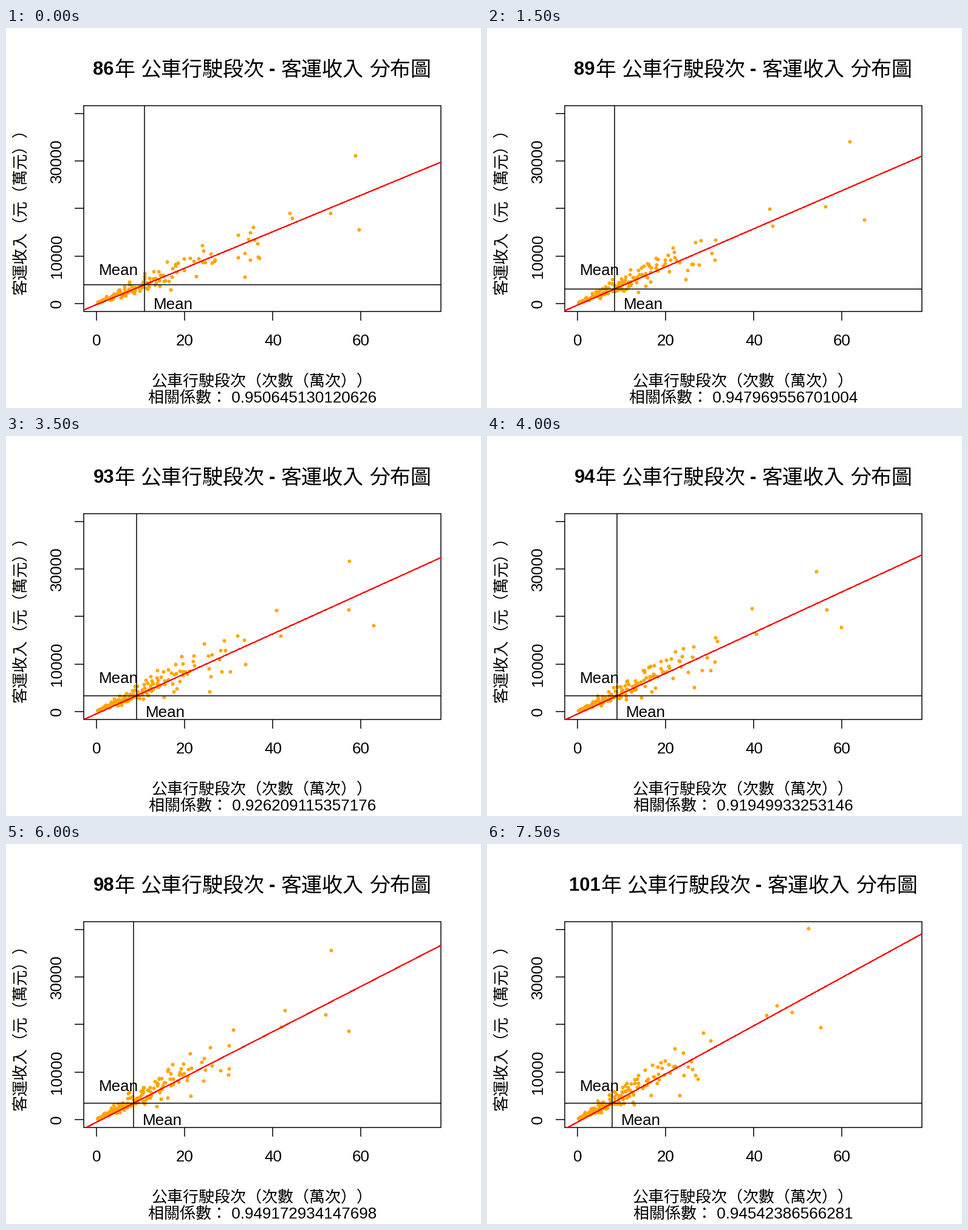
These frames come from a looping animation (782 px wide and 626 px high, 8000 ms). A matplotlib script:

```python
import numpy as np
import matplotlib.pyplot as plt
from matplotlib.animation import FuncAnimation
from matplotlib.patches import Rectangle

W, H, DPI = 782, 626, 64
YEARS = 16
PT = 72 / DPI  # points per pixel
plt.rcParams["font.family"] = ["Liberation Sans", "Noto Sans CJK JP"]

LEFT, RIGHT, TOP, BOTTOM = 128, 716, 128, 467
X0, Y0 = 149.4, 454
X_UNIT, Y_UNIT = 7.25, 78.3 / 10000

# Key years, counted from 86, and their statistics (positions in pixels)
KEYS = [0, 3, 5, 8, 10, 12, 15]
MEAN_X = [228, 210, 217, 214, 214, 210, 206]
MEAN_Y = [423, 430, 427, 428, 427, 427, 427]
FIT_END = [221, 211, 209, 196, 193, 167, 148]
CORR = [0.950645130120626, 0.947969556701004, 0.939628681008609,
        0.91949933253146, 0.948373566108065, 0.949172934147698,
        0.94542386566281]

# Paths of the five busiest routes
PATH_YEARS = [0, 5, 8, 15]
PATHS = [
    [(575, 210), (611, 171), (542, 223), (529, 139)],
    [(581, 332), (648, 305), (583, 315), (549, 302)],
    [(534, 305), (573, 287), (559, 286), (502, 277)],
    [(467, 305), (463, 293), (436, 284), (477, 266)],
    [(471, 313), (469, 334), (443, 326), (460, 282)],
]

# Other routes: dense near zero, with a thin tail of long ones
ROUTES = 200
rng = np.random.default_rng(86)
u = rng.permutation(np.linspace(0, 0.99, ROUTES))
TRIPS = 0.2 + 22 * u ** 1.7 + 13 * u ** 12
RATIO = np.clip(rng.normal(1, 0.22, ROUTES), 0.45, 1.7)


def at(year, values):
    return np.interp(year, KEYS, values)


def stats(year):
    """Mean position and slope of the fit, which runs through the mean."""
    mx, my = at(year, MEAN_X), at(year, MEAN_Y)
    return mx, my, (at(year, FIT_END) - my) / (RIGHT - mx)


def points(year):
    mx, _, slope = stats(year)
    noise = np.random.default_rng(year)
    n = int(np.interp(year, [0, 3], [150, ROUTES]))
    dx = TRIPS[:n] * (mx - X0) / 9.3 * noise.normal(1, 0.05, n)
    dy = dx * slope * RATIO[:n] * noise.normal(0.98, 0.06, n)
    cloud = np.column_stack([X0 + dx, Y0 - 1 + dy])
    busy = [[np.interp(year, PATH_YEARS, c) for c in zip(*p)] for p in PATHS]
    return np.vstack([cloud, busy])


fig = plt.figure(figsize=(W / DPI, H / DPI), dpi=DPI, facecolor="white")
ax = fig.add_axes([0, 0, 1, 1])
ax.set_xlim(0, W)
ax.set_ylim(H, 0)
ax.axis("off")


def label(x, y, s, size=26, ha="center", **kw):
    return ax.text(x, y, s, fontsize=size * PT, ha=ha, va="baseline",
                   rotation_mode="anchor", color="black", zorder=4, **kw)


def line(xs, ys, color="black", width=1.5, **kw):
    return ax.plot(xs, ys, color=color, lw=width * PT, zorder=3,
                   solid_capstyle="butt", **kw)[0]


# Frame, ticks and fixed labels
box = Rectangle((LEFT, TOP), RIGHT - LEFT, BOTTOM - TOP, fill=False,
                ec="black", lw=1.5 * PT, zorder=3)
ax.add_patch(box)
for v in range(0, 61, 20):
    x = X0 + v * X_UNIT
    line([x, x], [BOTTOM, BOTTOM + 15])
    label(x, 523, str(v))
for v in range(0, 40001, 10000):
    y = Y0 - v * Y_UNIT
    line([LEFT - 15, LEFT], [y, y])
    if v in (0, 10000, 30000):
        label(91, y, str(v), rotation=90)
label(422, 590, "公車行駛段次（次數（萬次））")
label(31.5, 297, "客運收入（元（萬元））", rotation=90)
label(185, 407, "Mean")

# Title pieces, placed after the year number
TITLE = [(178, "年"), (221, "公車行駛段次"), (433, "-"),
         (453, "客運收入"), (598, "分布圖")]
year_text = label(178, 77, "", 31, "right", weight="bold")
title = [label(x, 77, s, 31, "left", weight="bold") if s == "-"
         else label(x, 79, s, 34, "left") for x, s in TITLE]

dots = ax.scatter([], [], s=(6 * PT) ** 2, c="#FFA500", linewidths=0,
                  antialiased=False, zorder=2)
fit = line([], [], "red", 1, antialiased=False)
fit.set_clip_path(box)
v_mean = line([], [])
h_mean = line([], [])
mean_text = label(0, 463, "Mean")
corr_text = label(422, 618, "")


def update(year):
    name = str(86 + year)
    shift = 9 * (len(name) - 2)
    year_text.set_text(name)
    year_text.set_x(178 + shift)
    for piece, (x, _) in zip(title, TITLE):
        piece.set_x(x + shift)

    mx, my, slope = stats(year)
    v_mean.set_data([mx, mx], [TOP, BOTTOM])
    h_mean.set_data([LEFT, RIGHT], [my, my])
    mean_text.set_x(mx + 47)
    ends = np.array([LEFT, RIGHT])
    fit.set_data(ends, my + slope * (ends - mx))
    dots.set_offsets(points(year))
    corr_text.set_text(f"相關係數： {at(year, CORR):.15g}")
    return dots, fit, v_mean, h_mean, mean_text, corr_text, year_text, *title


anim = FuncAnimation(fig, update, frames=YEARS, interval=500,
                     repeat=True, repeat_delay=0, blit=False)
plt.show()
```
